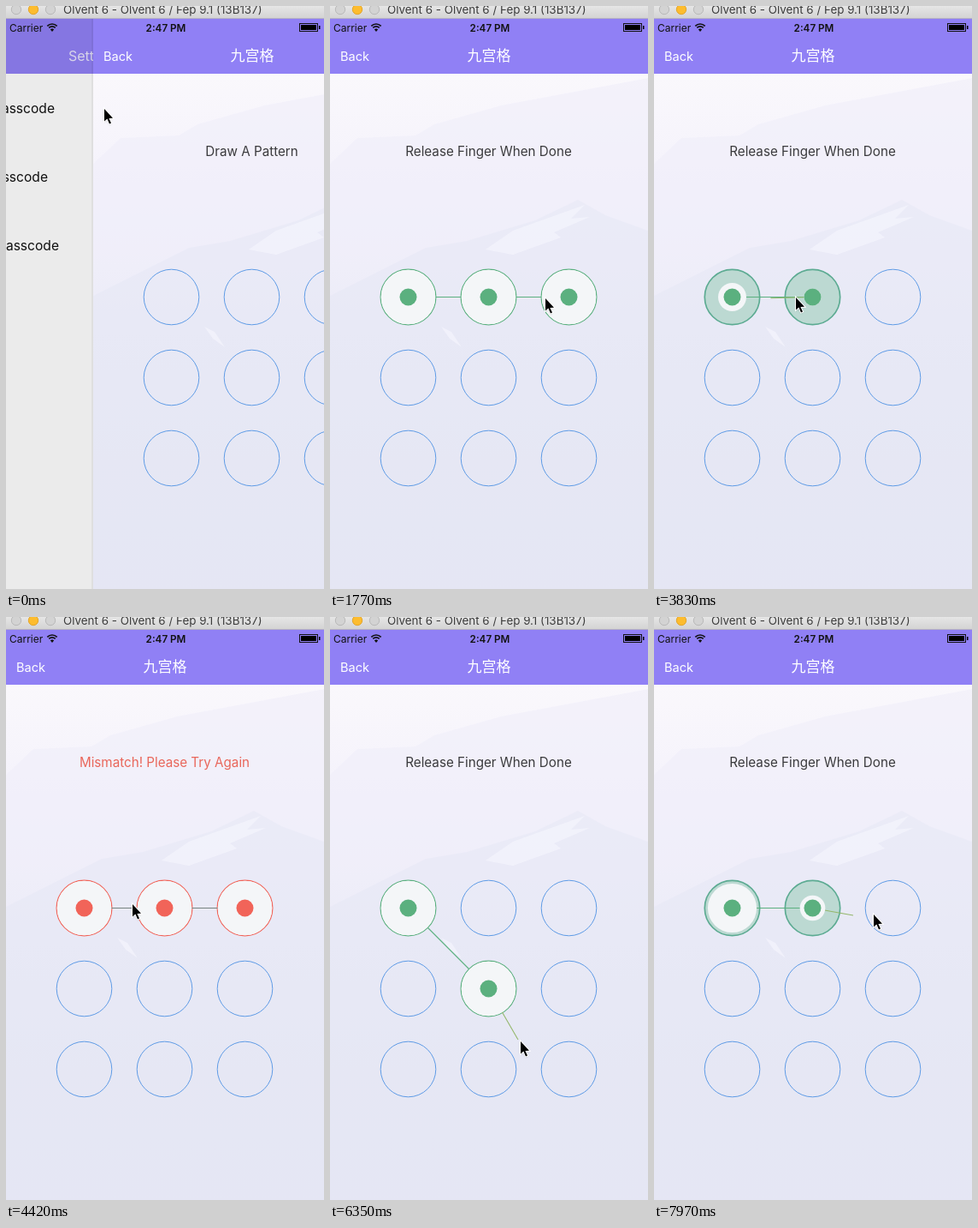
Write an HTML page with a canvas that moves like this. It is 372 px wide and 680 px high and loops after 8000 ms.

```html
<!DOCTYPE html>
<html lang="en">
<head>
<meta charset="utf-8">
<title>Pattern lock</title>
<style>
html, body { margin: 0; width: 100%; height: 100%; overflow: hidden; }
canvas { display: block; }
</style>
</head>
<body>
<canvas id="stage" width="372" height="680"></canvas>
<script>
const ctx = document.getElementById('stage').getContext('2d');
const W = 372, H = 680, LOOP = 8000, STEP = 147.3;
const RIPPLE = 2.7, LAG = 0.4;   // in steps
const SANS = 'Inter, "Open Sans", sans-serif';
const CJK = '"Noto Sans CJK SC", "Noto Sans CJK", sans-serif';
const BLUE = '#5e9be6', GREEN = '#5bb07f', RED = '#f16459', PURPLE = '#9080f5';
const DARK = '#3a3a3c';
const DONE = 'Release Finger When Done', CONFIRM = 'Draw Again To Confirm';

// Pointer position: [step, x, y]
const pointerKeys = [
  [0, 115, 120], [2, 95, 290], [2.6, 92, 338], [5.4, 250, 339], [8, 254, 339],
  [10, 254, 339], [12, 252, 341], [14, 252, 341], [16, 215, 400], [18, 186, 490],
  [20, 187, 527], [22, 187, 527], [25, 92, 342], [27, 240, 338], [28, 348, 338],
  [30, 148, 335], [32, 95, 338], [35, 272, 340], [38, 107, 340], [39, 100, 341],
  [42, 190, 445], [42.6, 220, 493], [43, 223, 495], [44, 262, 520], [46, 195, 528],
  [48, 185, 520], [51, 95, 345], [52, 100, 339], [53.6, 233, 348], [54, 257, 347]
];

// touches: [step, dot]; an error keeps the dots red until "end"
const gestures = [
  { touches: [[2.6, 0], [4, 1], [5.3, 2], [16.3, 4], [18.1, 7]], release: 21, end: 21, message: CONFIRM },
  { touches: [[25.2, 0], [26, 1], [27, 2]], release: 28, end: 32, error: true,
    message: 'Mismatch! Please Try Again' },
  { touches: [[32, 0], [33, 1], [34, 2]], release: 35, end: 37.5, error: true,
    message: 'Passcode length should be longger than 3' },
  { touches: [[39, 0], [40.3, 4], [43.8, 8], [45.3, 7]], release: 47, end: 47, message: CONFIRM },
  { touches: [[51.7, 0], [53.4, 1]], release: 99, end: 99 }
];

const center = i => [91.5 + 94 * (i % 3), 339.5 + 94 * Math.floor(i / 3)];

function pointerAt(step) {
  const i = pointerKeys.findIndex(key => key[0] > step);
  if (i < 0) return pointerKeys.at(-1).slice(1);
  const [s0, x0, y0] = pointerKeys[Math.max(0, i - 1)], [s1, x1, y1] = pointerKeys[i];
  const p = Math.max(0, (step - s0) / (s1 - s0 || 1));
  return [x0 + (x1 - x0) * p, y0 + (y1 - y0) * p];
}

function rect(x, y, w, h, fill) {
  ctx.fillStyle = fill;
  ctx.fillRect(x, y, w, h);
}

function text(str, x, y, size, color, align = 'left', weight = 400, family = SANS) {
  ctx.font = `${weight} ${size}px ${family}`;
  ctx.textAlign = align;
  ctx.fillStyle = color;
  ctx.fillText(str, x, y);
}

function circle([x, y], r, fill, stroke, width = 1) {
  ctx.beginPath();
  ctx.arc(x, y, r, 0, 7);
  if (fill) { ctx.fillStyle = fill; ctx.fill(); }
  if (stroke) { ctx.strokeStyle = stroke; ctx.lineWidth = width; ctx.stroke(); }
}

function line(a, b, color) {
  ctx.beginPath();
  ctx.moveTo(...a);
  ctx.lineTo(...b);
  ctx.strokeStyle = color;
  ctx.lineWidth = 1.1;
  ctx.stroke();
}

function shape(points, fill) {
  ctx.beginPath();
  points.forEach(p => ctx.lineTo(...p));
  ctx.closePath();
  ctx.fillStyle = fill;
  ctx.fill();
}

function gradient(y0, y1, ...colors) {
  const g = ctx.createLinearGradient(0, y0, 0, y1);
  colors.forEach((c, i) => g.addColorStop(i / (colors.length - 1), c));
  return g;
}

function drawLandscape() {
  rect(0, 79, W, H - 79, gradient(79, H, '#faf8fc', '#f3f1fb', '#ebebf7', '#e7e8f4', '#e5e6f3'));
  shape([[0, 184], [32, 154], [100, 151], [122, 138], [200, 116], [372, 84], [372, 300], [0, 300]],
    'rgba(240,239,251,.6)');
  shape([[0, 338], [112, 282], [160, 274], [240, 250], [290, 226], [322, 244], [372, 262], [W, H], [0, H]],
    'rgba(229,231,245,.5)');
  const snow = 'rgba(250,250,255,.5)';
  shape([[182, 284], [214, 262], [298, 232], [282, 248], [304, 246], [262, 264], [270, 270], [214, 290]], snow);
  shape([[130, 374], [142, 380], [154, 398], [140, 388]], snow);
}

function drawLock(step) {
  const gesture = gestures.find(g => step >= g.touches[0][0] && step < g.end);
  const touched = gesture ? gesture.touches.filter(([s]) => s <= step) : [];
  const failed = gesture && step >= gesture.release;
  const tint = failed ? RED : GREEN;
  const age = i => {
    const hit = touched.find(t => t[1] === i);
    return hit ? Math.min(1, (step - hit[0]) / RIPPLE) : -1;
  };

  for (let i = 0; i < 9; i++) {
    const p = age(i);
    if (p < 0) circle(center(i), 32.3, null, BLUE);
    else if (p < 1 && !failed) circle(center(i), 32.2, '#bcd9d2', '#5cab92', 1.7);
    else circle(center(i), 32.4, '#f4f6f8', tint, 1.2);
  }
  touched.forEach(([, dot], i) => {
    if (i) line(center(touched[i - 1][1]), center(dot), failed ? '#77837f' : GREEN);
  });
  if (touched.length && !failed) line(center(touched.at(-1)[1]), pointerAt(step - LAG), '#94b76b');
  for (const [, dot] of touched) {
    const p = failed ? 1 : age(dot);
    circle(center(dot), 10 + 21.8 * p, '#f4f6f8');
    circle(center(dot), 10, tint);
  }
}

function caption(step) {
  let label = ['Draw A Pattern', DARK];
  for (const g of gestures) {
    if (step >= g.touches[0][0]) label = [DONE, DARK];
    if (step >= g.release) label = [g.message, g.error ? '#e9665a' : DARK];
  }
  return label;
}

function drawSettings(progress) {
  ctx.save();
  ctx.translate(-0.3 * W * progress, 0);
  rect(0, 15, W * 1.3, H, '#fff');
  rect(0, 15, W * 1.3, 64, PURPLE);
  text('Settings', 154, 64, 16, 'rgba(255,255,255,.8)');
  text('Create Passcode', 138, 125, 15.6, '#111', 'right');
  text('Verify Passcode', 130, 205, 15.6, '#111', 'right');
  text('Change Passcode', 143, 285, 15.6, '#111', 'right');
  ctx.restore();
  rect(0, 15, W, H, `rgba(0,0,0,${0.11 * progress})`);
}

function drawPatternScreen(step, offset) {
  ctx.save();
  ctx.translate(offset, 0);
  if (offset) rect(-2, 15, 2, H, 'rgba(0,0,0,.05)');
  drawLandscape();
  rect(0, 15, W, 64, PURPLE);
  text('Back', 12, 63.5, 14.6, '#fff');
  text('九宫格', 186, 64, 17, '#fff', 'center', 400, CJK);
  const [label, color] = caption(step);
  text(label, 185.5, 175, 15.2, color, 'center');
  drawLock(step);
  ctx.restore();
}

function drawChrome() {
  rect(0, 0, W, 15, gradient(0, 15, '#e6e6e6', '#d2d2d2'));
  rect(0, 14, W, 1, '#b5b0c4');
  ['#d3d3d3', '#fdbc2e', '#d3d3d3'].forEach((fill, i) =>
    circle([12 + 20 * i, 4], 5.7, fill, i === 1 ? '#e2a52c' : '#b9b9b9'));
  text('Olvent 6 - Olvent 6 / Fep 9.1 (13B137)', 67, 9, 13.4, '#3c3c3c');

  text('Carrier', 4, 29.5, 12, '#111');
  text('2:47 PM', 187, 29.5, 11.7, '#111', 'center', 600);
  ctx.strokeStyle = '#111';
  ctx.lineWidth = 1.7;
  for (const r of [8, 5.2]) {
    ctx.beginPath();
    ctx.arc(54, 29, r, -2.36, -0.78);
    ctx.stroke();
  }
  shape([[54, 30], [51.8, 27.2], [54, 26.3], [56.2, 27.2]], '#111');
  ctx.lineWidth = 1;
  ctx.strokeRect(343.5, 20.5, 21, 9);
  rect(345, 22, 18, 6, '#000');
  rect(366, 23, 1.5, 4, '#000');
}

function drawPointer([x, y]) {
  const arrow = [[0, 0], [0, 14.4], [3.4, 11.4], [6, 17.4], [8, 16.5], [5.4, 10.9], [10, 10.8]];
  ctx.save();
  ctx.translate(x, y);
  ctx.shadowColor = 'rgba(0,0,0,.3)';
  ctx.shadowBlur = 2;
  ctx.shadowOffsetY = 1;
  shape(arrow, '#000');
  ctx.shadowColor = 'transparent';
  ctx.strokeStyle = '#fff';
  ctx.lineWidth = 2;
  ctx.stroke();
  shape(arrow, '#000');
  ctx.restore();
}

function draw(now) {
  const step = Math.floor((now % LOOP) / STEP);
  const offset = [102, 14][step] || 0;
  if (offset) drawSettings(1 - offset / W);
  drawPatternScreen(step, offset);
  drawChrome();
  drawPointer(pointerAt(step));
}

const start = performance.now();
function tick() {
  draw(performance.now() - start);
  requestAnimationFrame(tick);
}
tick();
</script>
</body>
</html>
```
